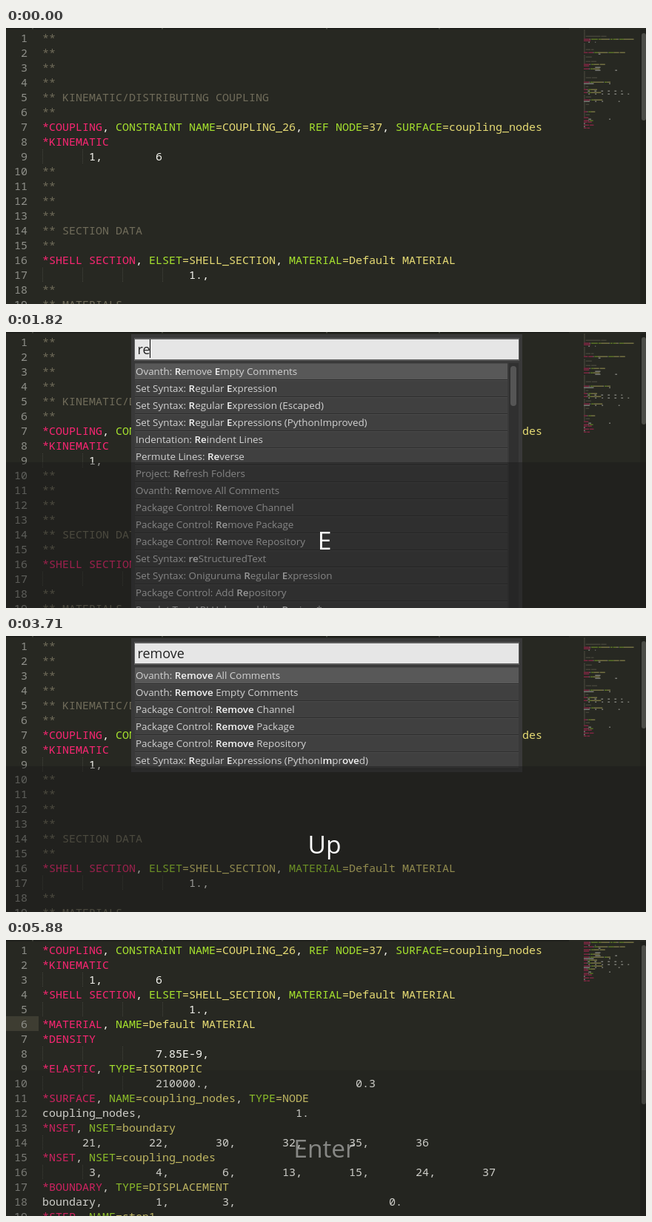
An HTML page with a canvas for the animation above (5950 ms loop, 864 px wide and 373 px high).

```html
<!DOCTYPE html>
<html lang="en">
<head>
<meta charset="utf-8">
<title>Removing comments from the command palette</title>
<style>
  html, body { margin: 0; width: 100%; height: 100%; overflow: hidden; background: #272822; }
  canvas { display: block; }
</style>
</head>
<body>
<canvas id="stage" width="864" height="373"></canvas>
<script>
const ctx = document.getElementById("stage").getContext("2d");
const W = 864, H = 373, LOOP = 5950, STEP = 70;
const MONO = '15px "Noto Sans Mono", monospace';
const SANS = '"Open Sans", "Noto Sans", sans-serif';
const C = { bg: "#272822", comment: "#706c5a", keyword: "#f92672", key: "#a6e22e",
            value: "#e6db74", plain: "#f8f8f2", number: "#8f908a" };

// Places text fields at columns: row(col, text, col, text, ...)
function row(...fields) {
  let line = "";
  for (let i = 0; i < fields.length; i += 2) line = line.padEnd(fields[i]) + fields[i + 1];
  return line;
}

// A number stands for that many empty comment lines.
const fullText = [
  4, "** KINEMATIC/DISTRIBUTING COUPLING", 1,
  "*COUPLING, CONSTRAINT NAME=COUPLING_26, REF NODE=37, SURFACE=coupling_nodes",
  "*KINEMATIC", row(7, "1,", 17, "6"),
  4, "** SECTION DATA", 1,
  "*SHELL SECTION, ELSET=SHELL_SECTION, MATERIAL=Default MATERIAL", row(22, "1.,"),
  1, "** MATERIALS", 2, "** Default MATERIAL", 1,
  "*MATERIAL, NAME=Default MATERIAL", "*DENSITY", row(17, "7.85E-9,"),
  "*ELASTIC, TYPE=ISOTROPIC", row(17, "210000.,", 47, "0.3"),
  4, "** COUPLING SURFACES", 2,
  "*SURFACE, NAME=coupling_nodes, TYPE=NODE", row(0, "coupling_nodes,", 38, "1."),
  1, "** SETS", 1,
  "*NSET, NSET=boundary", row(6, "21,", 16, "22,", 26, "30,", 36, "32,", 46, "35,", 56, "36"),
  "*NSET, NSET=coupling_nodes",
  row(7, "3,", 17, "4,", 27, "6,", 36, "13,", 46, "15,", 56, "24,", 66, "37"),
  1, "** BOUNDARY", 1,
  "*BOUNDARY, TYPE=DISPLACEMENT", row(0, "boundary,", 17, "1,", 27, "3,", 52, "0."),
  1, "** STEPS", 4, "*STEP, NAME=step1", 1, "** STATIC", 1,
  "*STATIC", row(7, "0.1,", 38, "1."),
  "*OUTPUT, FIELD", "*NODE OUTPUT", "U,", "*ELEMENT OUTPUT", "S,", "*END STEP"
].flatMap(item => typeof item === "number" ? Array(item).fill("**") : item);
const cleanText = fullText.filter(line => !line.startsWith("**"));

function tokenize(line) {
  if (line.startsWith("**")) return [[0, line, C.comment]];
  if (!line.startsWith("*")) return [[0, line, C.plain]];
  return [...line.matchAll(/^\*[^,]*|,|=[^,]*|[^,=]+/g)].map(({ 0: text, index }) => [index, text,
    index === 0 ? C.keyword : text === "," ? C.plain : text[0] === "=" ? C.value : C.key]);
}

function rect(color, x, y, w, h) {
  ctx.fillStyle = color;
  ctx.fillRect(x, y, w, h);
}

function pill(color, x, y, w, h) {
  ctx.fillStyle = color;
  ctx.beginPath();
  ctx.roundRect(x, y, w, h, w / 2);
  ctx.fill();
}

function text(string, x, y, color, font, align = "left") {
  ctx.font = font;
  ctx.fillStyle = color;
  ctx.textAlign = align;
  ctx.fillText(string, x, y);
}

function drawMinimap(lines) {
  ctx.globalAlpha = 0.5;
  lines.forEach((line, i) => {
    for (const [col, string, color] of tokenize(line))
      for (const word of string.matchAll(/\S+/g))
        rect(color, 780 + (col + word.index) * 0.9, 2.6 + 2 * i, word[0].length * 0.9, 1.2);
  });
  ctx.globalAlpha = 1;
}

function drawEditor(lines, thumbHeight, activeLine) {
  rect(C.bg, 0, 0, W, H);
  rect("#1b1c18", 0, 0, 760, 1.5);
  for (const x of [35, 210, 432, 584]) rect("#45463f", x, 0, 2, 1.5);
  if (activeLine) rect("#3e3d32", 0, 103, 44, 20);
  lines.slice(0, 19).forEach((line, i) => {
    const base = 19 + 20 * i;
    text(i + 1, 29, base, C.number, MONO, "right");
    const indent = line.search(/\S/);
    for (let col = 0; col < indent; col += 6)
      for (let y = 0; y < 20; y += 2) rect("#45463e", 49 + col * 9, base - 15 + y, 1, 1);
    for (const [col, string, color] of tokenize(line)) text(string, 49 + col * 9, base, color, MONO);
  });
  drawMinimap(lines);
  rect("#20211c", 856, 2, 8, H);
  pill("#4c4d47", 858, 7, 6, thumbHeight);
}

// Square brackets mark the matched, bold letters; "|" starts a shortcut.
const allCommands = [
  "Code Folding: Unfold All|Ctrl+K, Ctrl+J", "Compare selections", "Compare with...",
  "Convert Case: Lower Case|Ctrl+K, Ctrl+L", "Convert Case: Swap Case", "Convert Case: Title Case",
  "Convert Case: Upper Case|Ctrl+K, Ctrl+U", "Export to BBCode: Show Export Menu",
  "Export to HTML: Show Export Menu", "Export to HTML: Toggle Annotation Mode", "File: Close All",
  "File: New View into File", "File: Save All", "HTML: Encode Special Characters",
  "HTML: Wrap Selection With Tag|Alt+Shift+W"
];
const reCommands = [
  "Ovanth: [R]emove [E]mpty Comments", "Set Syntax: [R]egular [E]xpression",
  "Set Syntax: [R]egular [E]xpression (Escaped)", "Set Syntax: [R]egular [E]xpressions (PythonImproved)",
  "Indentation: [Re]indent Lines", "Permute Lines: [Re]verse", "Project: [Re]fresh Folders",
  "Ovanth: [Re]move All Comments", "Package Control: [Re]move Channel", "Package Control: [Re]move Package",
  "Package Control: [Re]move Repository", "Set Syntax: [re]StructuredText",
  "Set Syntax: Oniguruma [R]egular [E]xpression", "Package Control: Add [Re]pository",
  "Pagelet Text API Helper: adding [Re]gion *"
];
function removeCommands(length) {
  const verb = `[${"Remove".slice(0, length)}]${"Remove".slice(length)}`;
  const tail = length > 3 ? `pr[${"ove".slice(0, length - 3)}]${"ove".slice(length - 3)}d` : "proved";
  return [`Ovanth: ${verb} All Comments`, `Ovanth: ${verb} Empty Comments`,
    ...["Channel", "Package", "Repository"].map(noun => `Package Control: ${verb} ${noun}`),
    `Set Syntax: [R]egular [E]xpressions (PythonI[m]${tail})`];
}
const remCommands = [...removeCommands(3),
  "Expo[r]t to BBCode: Show [E]xport [M]enu", "Expo[r]t to HTML: Show [E]xport [M]enu",
  "Expo[r]t to HTML: Toggl[e] Annotation [M]ode", "File: [R]ena[me]", "P[re]ferences: [M]ouse Bindings",
  "P[re]ferences: The[m]e", "Indentation: [Re]indent [m]arked Lines", "Project: [Rem]ove Folders",
  "P[re]ferences: Command [M]enu"
];

function drawCommand(command, y) {
  const [label, shortcut] = command.split("|");
  let x = 175;
  label.split(/[[\]]/).forEach((part, i) => {
    text(part, x, y + 16, i % 2 ? "#f4f4f4" : "#d2d2d2", `${i % 2 ? 600 : 400} 13.4px ${SANS}`);
    x += ctx.measureText(part).width;
  });
  if (shortcut) text(shortcut, 676, y + 15, "#f4f4f4", `11px ${SANS}`, "right");
}

function drawPalette({ query, commands, selected, top = 42, thumb }, caret) {
  const bottom = thumb ? H : 184, right = thumb ? 677 : 692;
  rect("#393939", 169, 3, 528, bottom - 3);
  ctx.save();
  ctx.beginPath();
  ctx.rect(169, 41, 528, bottom - 41);
  ctx.clip();
  commands.forEach((command, i) => {
    const y = top + 23 * i;
    rect(i === selected ? "#585858" : "#404040", 174, y, right - 174, 23);
    rect("#2e2e2e", 174, y + 22, right - 174, 1);
    rect("#4a4a4a", 174, y, right - 174, 1);
    drawCommand(command, y);
  });
  if (thumb) {
    rect("#303030", 679, 42, 13, H);
    pill("#555", 681, thumb[0], 8, thumb[1]);
  }
  ctx.restore();
  rect("#5c5c5c", 173, 8, 520, 31);
  rect("#e6e6e6", 174, 10, 518, 27);
  text(query, 177.5, 30, "#222", `18px ${SANS}`);
  const caretX = Math.round(177 + ctx.measureText(query).width);
  rect(`rgba(0,0,0,${caret})`, caretX, 10, 1, 25);
}

function drawKey(label, opacity) {
  ctx.globalAlpha = opacity;
  rect("rgba(24,24,24,.42)", 0, 176, W, H - 176);
  text(label, 430, 294, "#fff", `33.5px ${SANS}`, "center");
  ctx.globalAlpha = 1;
}

// Latest entry of [time, value] pairs that has begun.
const at = (track, t) => track.findLast(([start]) => t >= start)[1];

const keys = [[0, ""], [420, "Shift+Ctrl+P"], [1820, "E"], [1960, "M"], [2100, "O"], [2170, "V"],
              [2240, "E"], [2870, "Up"], [3990, "Enter"]];
const palettes = [
  [0, null],
  [840, { query: "", commands: allCommands, top: 31, thumb: [69, 22] }],
  [1820, { query: "re", commands: reCommands, selected: 0, thumb: [46, 54] }],
  [1960, { query: "rem", commands: remCommands, selected: 1, thumb: [46, 190] }],
  [2100, { query: "remo", commands: removeCommands(4), selected: 1 }],
  [2170, { query: "remov", commands: removeCommands(5), selected: 1 }],
  [2240, { query: "remove", commands: removeCommands(6), selected: 1 }],
  [2870, { query: "remove", commands: removeCommands(6), selected: 0 }],
  [3990, null]
];
const caretBlink = [
  [0, 1], [1330, 0.5], [1470, 0], [1820, 1], [2520, 0.7], [2660, 0.3], [2730, 0],
  [3150, 0.3], [3220, 0.6], [3360, 1], [3570, 0.7], [3640, 0.3], [3710, 0], [3990, 1],
  [4270, 0.7], [4340, 0.3], [4410, 0], [4900, 0.3], [4970, 0.6], [5180, 1],
  [5320, 0.7], [5390, 0.3], [5460, 0]
];

function draw(t) {
  const cleaned = t >= 3990, caret = at(caretBlink, t);
  drawEditor(cleaned ? cleanText : fullText, cleaned ? 215 : 118, cleaned);
  if (cleaned) rect(`rgba(248,248,242,${caret})`, 48, 103, 1, 20);
  const palette = at(palettes, t);
  if (palette) drawPalette(palette, caret);
  const fadeSteps = Math.max(0, Math.floor((t - 5180) / STEP) + 1);
  const key = at(keys, t);
  if (key) drawKey(key, 1 - 0.05 * fadeSteps);
}

function tick() {
  draw(performance.now() % LOOP);
  requestAnimationFrame(tick);
}
tick();
</script>
</body>
</html>
```
